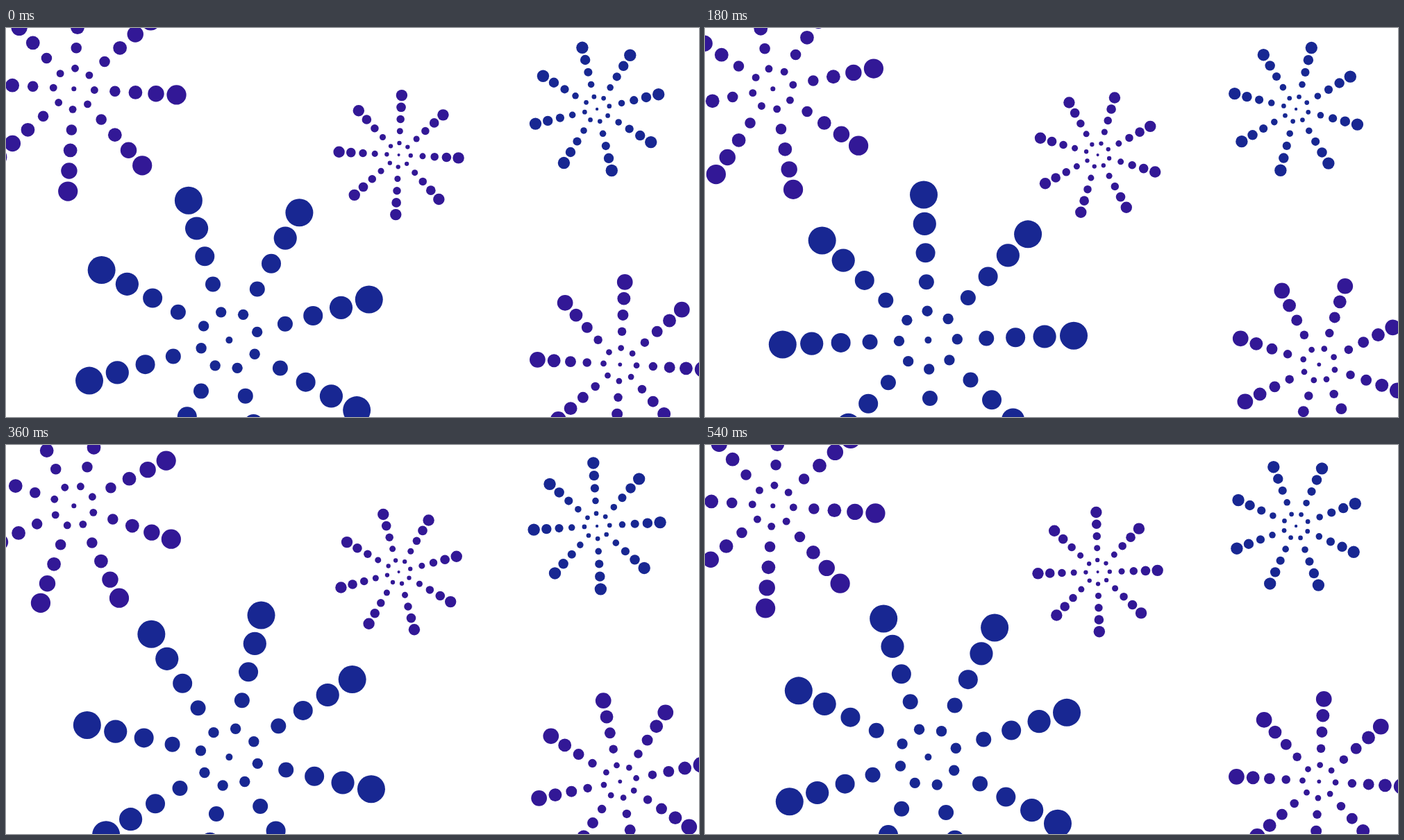
Write an HTML page with a canvas that moves like this. It is 998 by 561 pixels and loops after 0.57 s.

```html
<!DOCTYPE html>
<html lang="en">
<head>
<meta charset="utf-8">
<title>Spinning dot bursts</title>
<style>
  html, body { margin: 0; width: 100%; height: 100%; overflow: hidden; background: #fff; }
  canvas { display: block; }
</style>
</head>
<body>
<canvas id="stage" width="998" height="561"></canvas>
<script>
const ctx = document.getElementById('stage').getContext('2d');
const STEP_MS = 30;
const STEPS = 19;
const ARMS = 8;
const BLUE = '#182792';
const PURPLE = '#321896';

// Dot radius per ring, from the centre outwards, relative to the burst radius.
const DOT_SIZES = [5, 7.7, 11, 14, 16.6, 20].map(size => size / 209.7);

// Start angle and turn per step are in degrees.
const bursts = [
  { x: 97.8, y: 87.8, radius: 148, start: 3.33, turn: 5.045, color: PURPLE },
  { x: 565.6, y: 183.1, radius: 86.1, start: 2.87, turn: 2.258, color: PURPLE },
  { x: 851.1, y: 116.9, radius: 91.1, start: -13.45, turn: 4.594, color: BLUE },
  { x: 884.3, y: 485.3, radius: 119.1, start: 3.34, turn: 2.5, color: PURPLE },
  { x: 321.4, y: 450.1, radius: 209.7, start: -16.2, turn: 2.409, color: BLUE }
];

function dot(x, y, radius) {
  ctx.beginPath();
  ctx.arc(x, y, radius, 0, Math.PI * 2);
  ctx.fill();
}

function drawBurst({ x, y, radius, start, turn, color }, step) {
  const angle = (start + turn * step) * Math.PI / 180;
  const rings = DOT_SIZES.length - 1;
  ctx.fillStyle = color;
  dot(x, y, DOT_SIZES[0] * radius);
  for (let arm = 0; arm < ARMS; arm++) {
    const a = angle + arm * Math.PI * 2 / ARMS;
    for (let ring = 1; ring <= rings; ring++) {
      const distance = radius * ring / rings;
      dot(x + distance * Math.cos(a), y + distance * Math.sin(a), DOT_SIZES[ring] * radius);
    }
  }
}

function render() {
  const step = Math.floor(performance.now() / STEP_MS) % STEPS;
  ctx.fillStyle = '#fff';
  ctx.fillRect(0, 0, 998, 561);
  bursts.forEach(burst => drawBurst(burst, step));
  requestAnimationFrame(render);
}

render();
</script>
</body>
</html>
```
